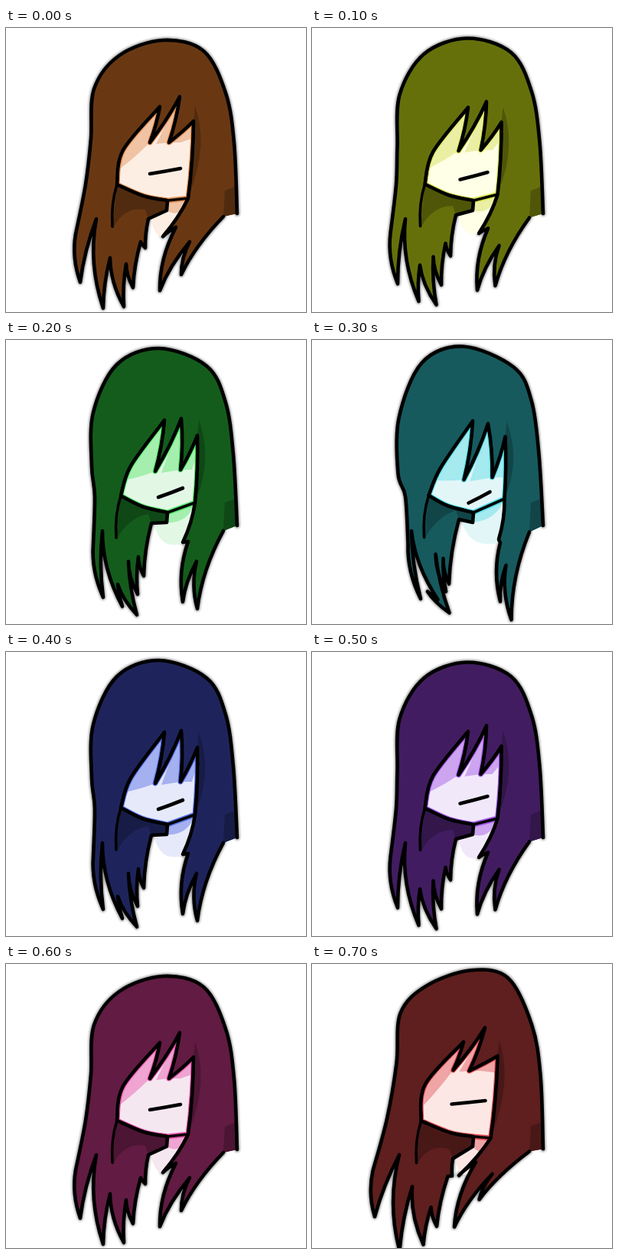
Write an HTML page that moves like this. It is 392 px wide and 372 px high and loops after 800 ms.

```html
<!DOCTYPE html>
<html lang="en">
<head>
<meta charset="utf-8">
<title>Swaying hair</title>
<style>
html, body { margin: 0; width: 100%; height: 100%; overflow: hidden; background: #fff; }
svg { display: block; width: 100%; height: 100%; }
path { fill: none; stroke-linecap: round; stroke-linejoin: round; }
.pose { --dark: color-mix(in srgb, var(--hair) 77%, #000); visibility: hidden; animation: show 800ms step-end infinite; }
.soft { stroke: #000; stroke-width: 7; opacity: .4; filter: blur(1.6px); }
.skin { fill: var(--skin); }
.shade { fill: hsl(var(--hue) 70% 79%); }
.glow { stroke: hsl(var(--hue) 75% 62%); stroke-width: 7; }
.hair { fill: var(--hair); }
.dark { fill: var(--dark); }
.line { stroke: #000; stroke-width: 4.6; }
.thin { stroke: #000; stroke-width: 3.6; }
.mouth { stroke: #000; stroke-width: 4.6; }
@keyframes show { 0% { visibility: visible } 12.5%, 100% { visibility: hidden } }
</style>
</head>
<body>
<svg id="stage" viewBox="0 0 392 372" preserveAspectRatio="none"></svg>
<script>
// Each part has key points for the sway at 0 and at 1.
const parts = {
  cap: ['302,243 298,150 287,85 258,30 205,16 148,36 115,80 111,145 104,205 91,270',
        '302,243 297,150 287,82 262,34 200,11 145,32 114,95 112,165 116,205 114,268'],
  locks: ['97,333 118,250 127,367 136,301 154,365 157,309 166,340 176,280 182,288 186,250',
          '127,337 126,250 152,349 146,320 171,360 160,290 172,333 173,284 180,309 190,240'],
  jaw: ['211,226 180,220 145,205', '211,226 178,218 150,204'],
  brow: ['153,160 201,103', '163,165 207,105'],
  bangs: ['188,150 227,90 213,150 245,122', '195,172 229,103 228,170 250,125'],
  side: ['238,223 205,273', '247,213 231,265'],
  ends: ['222,261 201,344 240,280 229,323 284,247', '238,264 231,343 249,290 250,352 284,250'],
  mouth: ['188,191 228,184', '199,206 231,194']
};

// Hue, hair and skin of each step.
const tints = [
  [25, '#693813', '#fdeee4'], [64, '#66700b', '#feffe6'],
  [128, '#145c1c', '#e2f8e5'], [184, '#165a5e', '#e2f6f8'],
  [230, '#1e245b', '#e5e9fa'], [272, '#421c60', '#f1e8fa'],
  [324, '#621b42', '#f5e7f0'], [358, '#5e1f1e', '#fce7e4']
];

const points = text => text.split(' ').map(s => s.split(',').map(Number));
const mix = (a, b, t) => a.map((v, k) => v + (b[k] - v) * t);
const shift = ([x, y], dx, dy) => [x + dx, y + dy];
const path = (kind, d) => `<path class="${kind}" d="${d}"/>`;
const poly = (kind, ...p) => path(kind, 'M' + p.join('L') + 'Z');

// Smooth run through all points.
function smooth(p) {
  return p.slice(1).map((b, i) => {
    const a = p[i], pre = p[i - 1] || a, post = p[i + 2] || b;
    return `C${a.map((v, k) => v + (b[k] - pre[k]) / 6)} ${b.map((v, k) => v - (post[k] - a[k]) / 6)} ${b}`;
  }).join('');
}

// Zigzag of sharp tips whose edges bow sideways, by a share of their length.
function zigzag(p, fall, rise = fall) {
  return p.slice(1).map((b, i) => {
    const a = p[i], bow = Math.hypot(b[0] - a[0], b[1] - a[1]) * (b[1] > a[1] ? fall : rise);
    return `Q${shift(mix(a, b, .5), bow, 0)} ${b}`;
  }).join('');
}

function draw(s) {
  const at = {};
  for (const [name, [from, to]] of Object.entries(parts)) {
    const end = points(to);
    at[name] = points(from).map((p, i) => mix(p, end[i], s));
  }
  const { locks, jaw, brow, bangs, side, ends, mouth } = at;
  // The crown rises when the head swings back.
  const rise = Math.max(0, -s) * 22;
  const cap = at.cap.map(([x, y]) => [x, y - rise * Math.max(0, 1 - y / 260)]);

  const [chin, , cheek] = jaw, [chinEnd] = side, [tip1, peak2, tip2, peak3] = bangs;
  const nape = locks[9], throat = shift(chin, -1, 13);
  const front = smooth(jaw) + smooth([cheek, ...brow]) + zigzag([brow[1], ...bangs], .05) +
    zigzag([peak3, chinEnd], .03);
  const face = `M${chin}${front}Z`;
  const hair = `M${cap[0]}${smooth(cap)}${zigzag([cap[9], ...locks], -.13, -.06)}L${throat}L${chin}${front}` +
    zigzag(side, .08) + zigzag([side[1], ...ends], -.13, -.1);
  const fold = `M${cheek}Q${shift(cheek, -8, 25)} ${shift(cheek, -6, 55)}`;

  return path('soft', hair) +
    path('skin', `M${throat}L${chinEnd}L${ends[0]}Q${shift(nape, 12, 40)} ${shift(nape, 3, 0)}Z`) +
    path('shade', `M${chin}L${chinEnd}Q${shift(chinEnd, -10, 28)} ${throat}Z`) +
    path('skin', face) +
    path('shade', `M${shift(cheek, 3, -20)}Q${shift(mix(cheek, tip1, .5), 2, -8)} ${tip1}L${brow[1]}L${brow[0]}Z`) +
    poly('shade', shift(tip1, 8, 2), tip2, shift(tip2, 15, 0), shift(peak3, 0, 22), peak3, peak2) +
    path('glow', face) + path('hair', hair) +
    path('dark', `M${cheek}${smooth([cheek, jaw[1], chin])}L${throat}L${nape}L${shift(nape, -4, -12)}` +
      `Q${shift(cheek, 10, 28)} ${shift(cheek, -6, 58)}Z`) +
    path('dark', `M${shift(peak3, 2, -20)}Q${shift(peak3, 20, 30)} ${shift(chinEnd, 2, -6)}L${peak3}Z`) +
    poly('dark', cap[0], shift(cap[0], -3, -35), shift(cap[0], -16, -30), ends[4]) +
    path('line', hair) + path('thin', face) + path('thin', fold) +
    path('mouth', 'M' + mouth[0] + zigzag(mouth, .04));
}

// The sway runs back and forth between -0.5 and 1.5.
const sway = step => 1.5 - Math.abs(step - 3) / 2;

document.getElementById('stage').innerHTML = tints.map(([hue, hair, skin], i) =>
  `<g class="pose" style="--hue:${hue};--hair:${hair};--skin:${skin};animation-delay:${(i - 8) * 100}ms">` +
  draw(sway(i)) + '</g>').join('');
</script>
</body>
</html>
```
